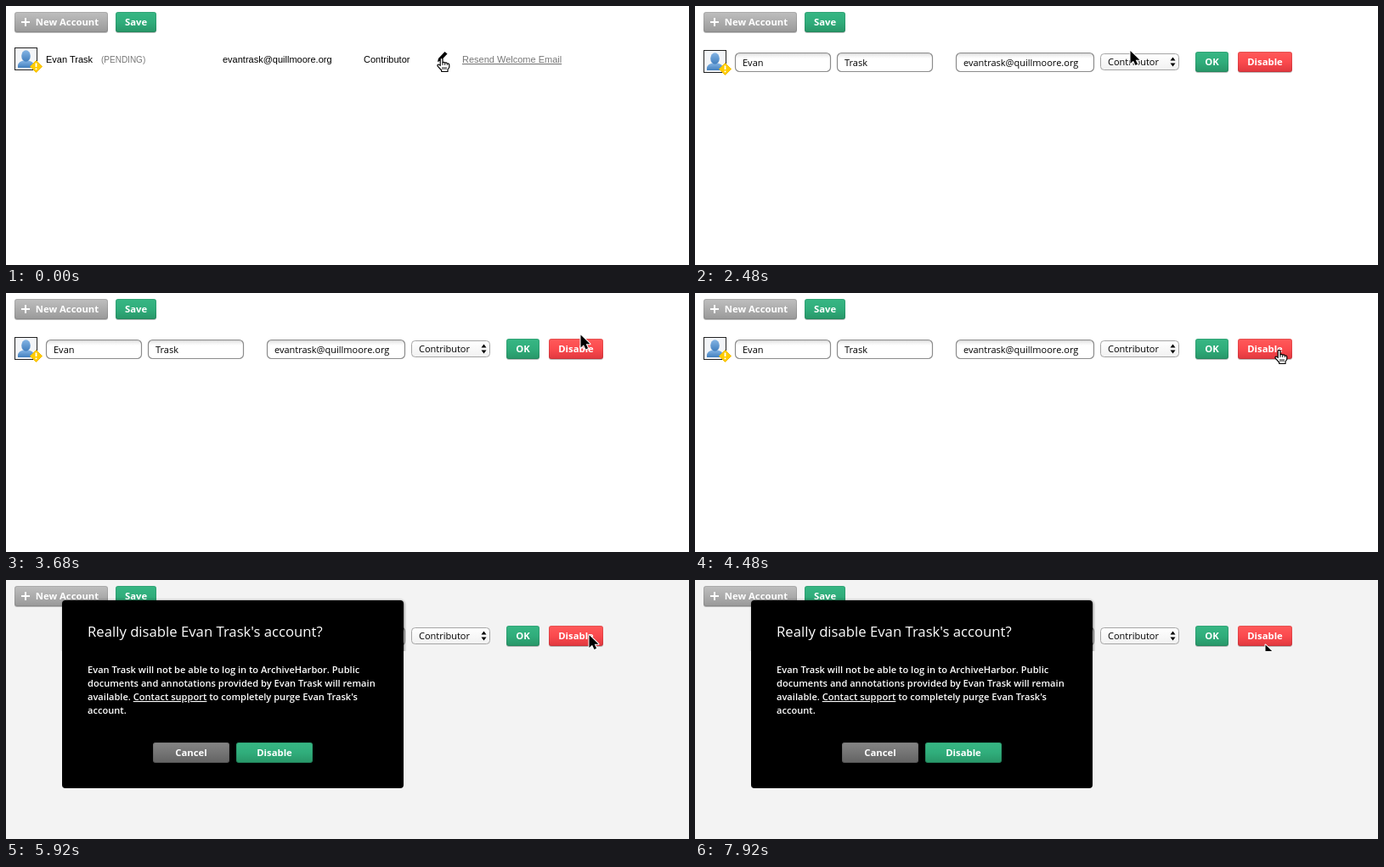
Recreate the animation shown at these times as an HTML page. Size 804 by 306 pixels, loop 8000 ms.

```html
<!DOCTYPE html>
<html lang="en">
<head>
<meta charset="utf-8">
<title>Disable an account</title>
<style>
  html, body { margin: 0; width: 100%; height: 100%; overflow: hidden; background: #fff; }
  svg { display: block; width: 804px; height: 306px; }
  text { white-space: pre; }
  .row { font: 11px "Liberation Sans", Arial, sans-serif; }
  .field { font: 11px "Open Sans", "Noto Sans", sans-serif; }
  .label { font: bold 11.3px "Open Sans", "Noto Sans", sans-serif; fill: #fff; text-anchor: middle; }
  .title { font: 500 16.7px "Open Sans", "Noto Sans", sans-serif; fill: #fff; }
  .body { font: 600 11.1px "Open Sans", "Noto Sans", sans-serif; fill: #fff; }
</style>
</head>
<body>
<svg id="stage" viewBox="0 0 804 306"></svg>
<script>
const FIRST = "Evan", LAST = "Trask", EMAIL = "evantrask@quillmoore.org";
const NAME = `${FIRST} ${LAST}`;
const LOOP = 8000, EDIT_AT = 1120, DIALOG_AT = 5920;

const gradient = (id, ...stops) => `<linearGradient id="${id}" x2="0" y2="1">${
  stops.map(([offset, color]) => `<stop offset="${offset}" stop-color="${color}"/>`).join("")
}</linearGradient>`;

const text = (x, y, cls, content, extra = "") =>
  `<text x="${x}" y="${y}" class="${cls}" ${extra}>${content}</text>`;

const button = (x, y, w, color, label, labelX = x + w / 2) => `
  <rect x="${x}" y="${y + 1}" width="${w}" height="24" rx="3" opacity=".25"/>
  <rect x="${x}" y="${y}" width="${w}" height="24" rx="3" fill="url(#${color})"/>
  <rect x="${x + .5}" y="${y + .5}" width="${w - 1}" height="23" rx="2.5" fill="none" stroke="#000" opacity=".1"/>
  ${text(labelX, y + 16, "label", label)}`;

const input = (x, w, value) => `
  <rect x="${x + .5}" y="55.5" width="${w - 1}" height="22" rx="5" fill="url(#inset)" stroke="#8c8c8c" stroke-width="1.2"/>
  ${text(x + 9, 71, "field", value)}`;

const avatar = y => `<g transform="translate(10 ${y})">
  <rect x=".5" y=".5" width="26" height="26" fill="#f3f5f8" stroke="#222"/>
  <path d="M4 24C3 18 7 16.500 10 15.500L17 15.500C20 16.500 24 18 23 24Z" fill="url(#blue)"/>
  <ellipse cx="13.500" cy="10" rx="5.300" ry="6.700" fill="url(#blue)"/>
  <path d="M25.500 15.500L32.500 22.500L25.500 29.500L18.500 22.500Z" fill="#fc0" stroke="#f3bd00" stroke-linejoin="round"/>
  <path d="M25.500 18.500v4.500m0 1.500v1.700" stroke="#fff" stroke-width="1.800"/>
</g>`;

const bodyLines = [
  `${NAME} will not be able to log in to ArchiveHarbor. Public`,
  `documents and annotations provided by ${NAME} will remain`,
  `available. <tspan text-decoration="underline">Contact support</tspan> to completely purge ${NAME}'s`,
  "account."
];

stage.innerHTML = `
<defs>
  ${gradient("gray", [0, "#bfbfbf"], [1, "#999"])}
  ${gradient("green", [0, "#37b784"], [.5, "#30ad7b"], [1, "#289668"])}
  ${gradient("red", [0, "#ff5a5a"], [.5, "#fb4a4e"], [1, "#e0383f"])}
  ${gradient("dark", [0, "#858585"], [1, "#636363"])}
  ${gradient("blue", [0, "#84b4e4"], [1, "#427fbe"])}
  ${gradient("inset", [0, "#d5d5d5"], [.15, "#f2f2f2"], [.3, "#fff"])}
  ${gradient("select", [0, "#fff"], [1, "#f1f1f1"])}
  <filter id="blur"><feGaussianBlur stdDeviation="1.5"/></filter>
  <clipPath id="above"><path d="M0 0H804V84H0Z"/></clipPath>
</defs>
<rect id="page" width="804" height="306"/>
${button(10, 7, 110, "gray", "New Account", 72)}
<path d="M18 19h10M23 14v10" stroke="#fff" stroke-width="2"/>
${button(129, 7, 48, "green", "Save")}

<g id="listing">
  ${avatar(49)}
  ${text(47, 67, "row", NAME)}
  ${text(112, 67, "row", "(PENDING)", 'style="font-size:10px" fill="#777"')}
  ${text(255, 67, "row", EMAIL)}
  ${text(421, 67, "row", "Contributor")}
  <path d="M508 66l1-4 7.500-8 3 2.500-7.500 8Z"/>
  ${text(537, 67, "row", "Resend Welcome Email", 'fill="#777" text-decoration="underline"')}
</g>

<g id="form">
  <g id="names">${avatar(52)}${input(47, 113, FIRST)}${input(167, 113, LAST)}</g>
  ${input(307, 163, EMAIL)}
  <rect x="477.500" y="56.500" width="92" height="19" rx="4" fill="url(#select)" stroke="#a5a5a5"/>
  ${text(486, 70, "field", "Contributor")}
  <path d="M559.500 64.500l3-4 3 4ZM559.500 67.500l3 4 3-4Z"/>
  ${button(589, 54, 39, "green", "OK")}
  ${button(639, 54, 64, "red", "Disable")}
</g>

<g id="dialog">
  <rect x="67" y="24" width="402" height="222" rx="5" opacity=".45" filter="url(#blur)" clip-path="url(#above)"/>
  <rect x="66" y="24" width="402" height="222" rx="4"/>
  ${text(96, 67, "title", `Really disable ${NAME}'s account?`)}
  ${bodyLines.map((line, i) => text(96, 110 + 16 * i, "body", line)).join("")}
  ${button(173, 192, 90, "dark", "Cancel")}
  ${button(271, 192, 90, "green", "Disable")}
</g>

<g clip-path="url(#above)"><g id="cursor" stroke="#fff" stroke-linejoin="round">
  <path id="arrow" stroke-width="2" paint-order="stroke" d="M0 0V15L3.500 11.800L6 17L8.600 15.800L6.200 10.700H11Z"/>
  <g id="hand">
    <path fill="#fff" stroke="#000" stroke-width="1.200" d="M-1.300 9.500V1.700Q-1.300 .3 0 .3T1.500 1.700V6Q3 4.800 4.200 6.300Q5.700 5.400 6.800 7Q9.300 6.500 9.300 9V11.500L7.500 14V16.500H.2V15L-4.300 10.200Q-5 8.500-3.500 8Q-2.300 8-1.300 9.500Z"/>
    <path stroke="#000" stroke-width=".9" d="M1.500 6V9M4.200 6.500V9M6.800 7.300V9M1.500 11v3M3.500 11v3M5.500 11v3"/>
  </g>
</g></g>`;

// Pointer hot spot: time, x, y
const path = [
  [0, 512.5, 61], [400, 511.5, 56], [1920, 511.5, 56], [2480, 512.5, 53],
  [2800, 682, 60], [3200, 682, 60], [3680, 676.5, 49.5], [4320, 687.5, 67],
  [5840, 687.5, 67], [5920, 686.5, 65], [6640, 686.5, 65], [7520, 690, 63], [7920, 671.5, 76.5]
];

function pointerAt(t) {
  const next = path.findIndex(([time]) => time > t);
  if (next < 0) return path.at(-1).slice(1);
  const [t0, x0, y0] = path[next - 1], [t1, x1, y1] = path[next];
  const p = (t - t0) / (t1 - t0), eased = p * p * (3 - 2 * p);
  return [x0 + (x1 - x0) * eased, y0 + (y1 - y0) * eased];
}

const byId = id => document.getElementById(id);
const show = (id, visible) => byId(id).setAttribute("display", visible ? "inline" : "none");

function draw(now) {
  const t = now % LOOP, editing = t >= EDIT_AT, confirming = t >= DIALOG_AT;
  const [x, y] = pointerAt(t);
  const overDisable = editing && !confirming && x >= 639 && y >= 54;
  const pointing = !editing || overDisable;
  byId("page").setAttribute("fill", confirming ? "#f3f3f3" : "#fff");
  show("listing", !editing);
  show("form", editing);
  show("names", !confirming);
  show("dialog", confirming);
  show("hand", pointing);
  show("arrow", !pointing);
  byId("cursor").setAttribute("transform", `translate(${x} ${y})`);
}

const start = performance.now();
function tick() {
  draw(performance.now() - start);
  requestAnimationFrame(tick);
}
tick();
</script>
</body>
</html>
```
